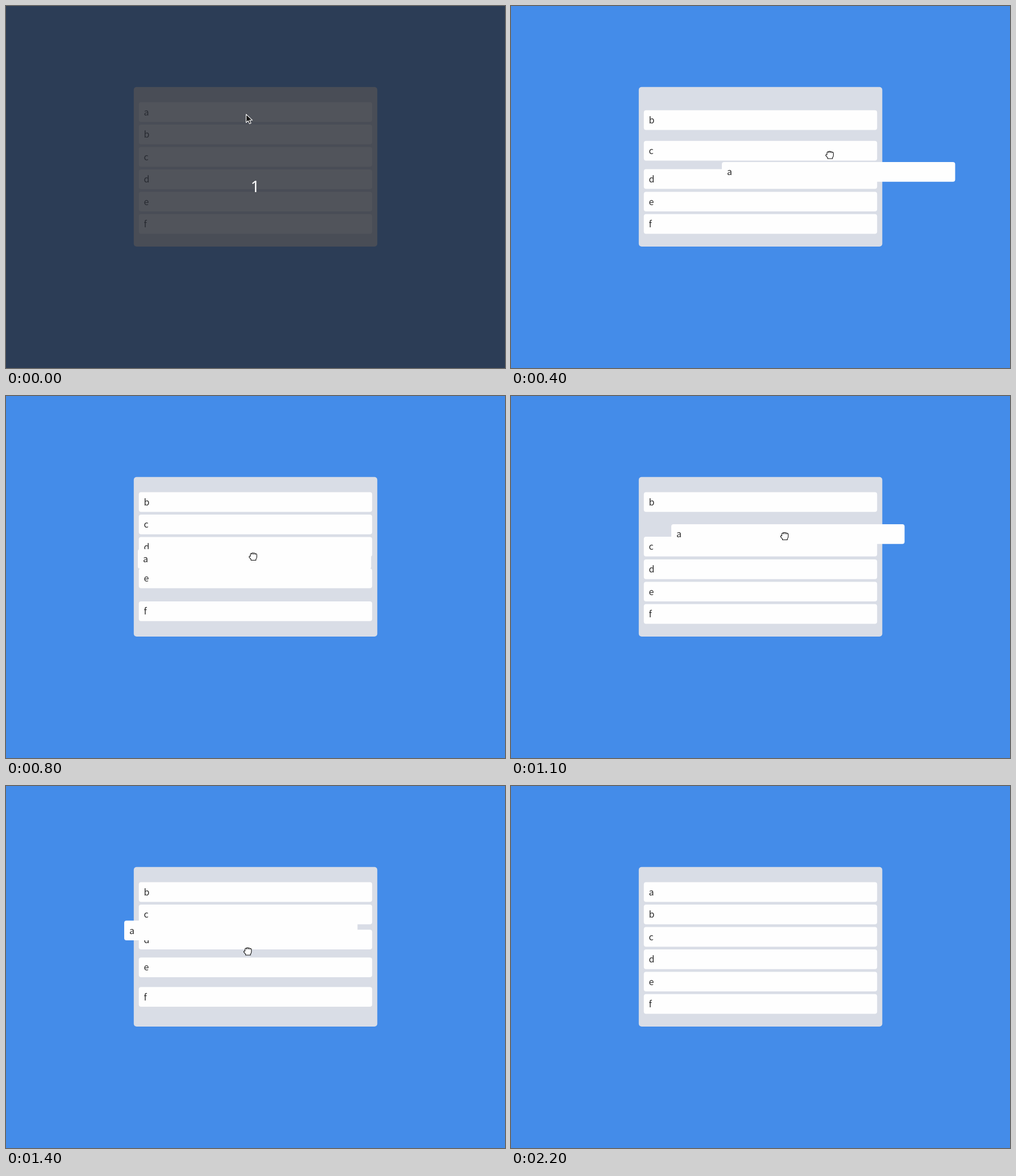
An HTML page with a canvas that plays this animation: 878 px wide and 638 px high, repeating every 2400 ms.

```html
<!DOCTYPE html>
<html lang="en">
<head>
<meta charset="utf-8">
<title>Sortable list</title>
<style>
html, body { margin: 0; width: 100%; height: 100%; overflow: hidden; background: #448ce9; }
canvas { display: block; }
</style>
</head>
<body>
<canvas id="stage" width="878" height="638"></canvas>
<script>
const ctx = document.getElementById('stage').getContext('2d');

const LOOP = 2400, STEP = 100;
const LEFT = 233.7, TOP = 169.6, PITCH = 39.45, ROW_W = 410.5, ROW_H = 34.7;
const GRAB = 3, RELEASE = 15, LEAVE = 22;
const SHIFT_STEPS = 1.6;
const LABELS = ['b', 'c', 'd', 'e', 'f'];

// Key points: [step, x, y]
const DRAG_PATH = [
  [2.6, LEFT, TOP], [4, 371, 275], [6, 318, 378], [8, 232, 269.7],
  [11, 282, 226], [12.7, 295, 362], [14, 208, 237.3], [16, LEFT, TOP]
];
const POINTER_PATH = [
  [2, 422, 190], [4, 560.5, 262.5], [6, 526, 395], [8, 434.5, 283],
  [11, 481, 247], [12.5, 495, 345], [14, 425, 291.5],
  [17, 319, 120], [19, 100, 5], [20, 50, 9], [21, 48, 11]
];

const smooth = p => p * p * (3 - 2 * p);

// Smooth curve through the key points, at rest at both ends
function along(path, t) {
  const last = path.length - 1;
  if (t <= path[0][0]) return path[0].slice(1);
  if (t >= path[last][0]) return path[last].slice(1);

  const i = path.findIndex(key => key[0] > t) - 1;
  const a = path[i], b = path[i + 1];
  const span = b[0] - a[0], p = (t - a[0]) / span;
  const slope = (k, axis) => k === 0 || k === last ? 0 :
    (path[k + 1][axis] - path[k - 1][axis]) / (path[k + 1][0] - path[k - 1][0]);

  return [1, 2].map(axis =>
    a[axis] + (b[axis] - a[axis]) * smooth(p) +
    span * p * (1 - p) * (slope(i, axis) * (1 - p) - slope(i + 1, axis) * p));
}

// A row rises into the gap while the dragged row is below its threshold;
// averaging over recent time makes it glide instead of jump.
function lift(index, step) {
  const threshold = TOP + PITCH * (index + .5), samples = 32;
  let below = 0;
  for (let k = 0; k < samples; k++) {
    const t = step - SHIFT_STEPS * (k + .5) / samples;
    if (along(DRAG_PATH, t)[1] > threshold) below++;
  }
  return smooth(below / samples);
}

function box(x, y, w, h, r, color) {
  ctx.fillStyle = color;
  ctx.beginPath();
  ctx.roundRect(x, y, w, h, r);
  ctx.fill();
}

function row(x, y, label) {
  box(x, y, ROW_W, ROW_H, 4, '#fefefe');
  ctx.fillStyle = '#2c2c2c';
  ctx.font = '300 16px "Noto Sans CJK SC", "Noto Sans CJK JP", "Noto Sans", sans-serif';
  ctx.textAlign = 'left';
  ctx.fillText(label, x + 8.9, y + 23.3);
}

function icon([x, y], outline, fill, stroke, details) {
  ctx.save();
  ctx.translate(x, y);
  ctx.lineJoin = 'round';
  ctx.lineWidth = 1.1;
  ctx.fillStyle = fill;
  ctx.strokeStyle = stroke;
  const shape = new Path2D(outline);
  ctx.fill(shape);
  ctx.stroke(shape);
  if (details) ctx.stroke(new Path2D(details));
  ctx.restore();
}

function arrow(point) {
  icon(point, 'M.5 .8V15.4L4 12.1 6.4 17.6 9 16.4 6.6 11.2H11.3Z', '#151515', '#fff');
}

function hand(point) {
  icon(point,
    'M-4.5-.5V-3.5Q-4-6-2-5.5Q-.8-7 .8-6Q2.6-6.8 3.6-5.2Q6.8-5.6 6.8-2.5V1' +
    'Q6.5 3.5 5.2 4.6V6.5H-3.4V4.8L-6.6 1.2Q-7.2-1.2-4.5-.5Z',
    '#fff', '#111', 'M-1.6-5.2V-3.4M1.2-5.6V-3.6M3.9-4.8V-3.2');
}

function countdown() {
  ctx.fillStyle = 'rgba(38,42,50,.8)';
  ctx.fillRect(0, 0, 878, 638);
  ctx.fillStyle = '#fff';
  ctx.font = '28px "Noto Sans", "Open Sans", sans-serif';
  ctx.textAlign = 'center';
  ctx.fillText('1', 438.5, 328);
}

function draw(step) {
  ctx.fillStyle = '#448ce9';
  ctx.fillRect(0, 0, 878, 638);
  box(224.8, 142.7, 428.5, 281.2, 5, '#d9dde6');

  LABELS.forEach((label, i) =>
    row(LEFT, TOP + PITCH * (i + 1 - lift(i, step)), label));
  row(...along(DRAG_PATH, step), 'a');

  if (step === 0) countdown();
  if (step < LEAVE) {
    const pointer = step >= GRAB && step < RELEASE ? hand : arrow;
    pointer(along(POINTER_PATH, step));
  }
}

function tick() {
  draw(Math.floor(performance.now() % LOOP / STEP));
  requestAnimationFrame(tick);
}
tick();
</script>
</body>
</html>
```
